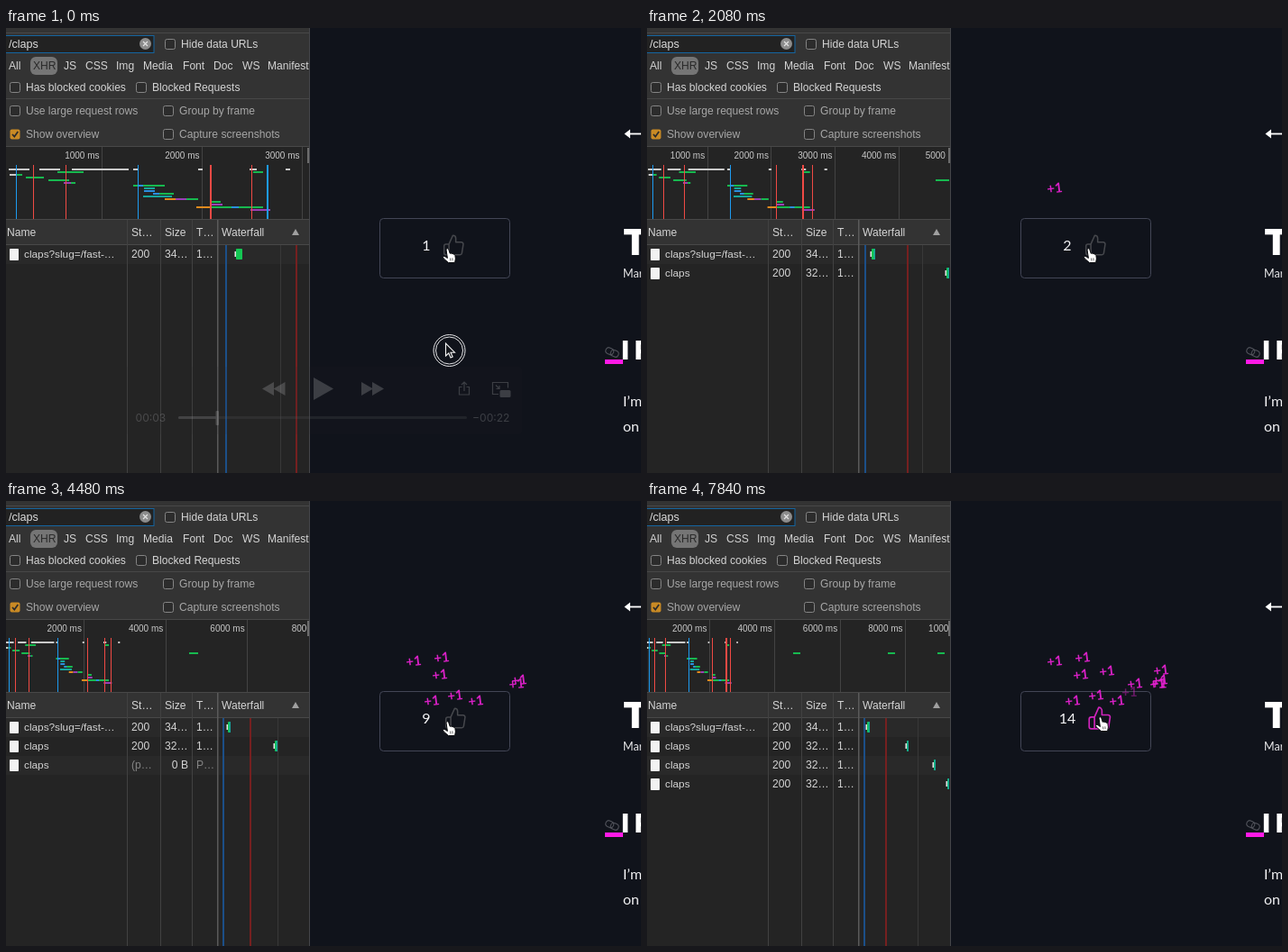
Animation, 704 px wide and 494 px high, one loop 8 s. Source, as an HTML page:

```html
<!DOCTYPE html>
<html lang="en">
<head>
<meta charset="utf-8">
<title>Clap button and network panel</title>
<style>
html, body { margin: 0; width: 100%; height: 100%; overflow: hidden; background: #10131b; }
svg { display: block; width: 704px; height: 494px; }
text { font: 12.1px "Liberation Sans", Arial, sans-serif; white-space: pre; }
.page { font-family: Lato, "Open Sans", sans-serif; }
.heavy { font-family: Inter, sans-serif; font-weight: 900; }
.clock { font-family: Inter, sans-serif; }
</style>
</head>
<body>
<svg viewBox="0 0 704 494">
  <defs><clipPath id="panel"><rect width="336" height="494"/></clipPath></defs>
  <g id="still"></g>
  <g id="live"></g>
</svg>
<script>
const LOOP = 8000, STEP = 160;
const PINK = '#ff1ae6';

const rect = (x, y, w, h, fill, more = '') =>
  `<rect x="${x}" y="${y}" width="${w}" height="${h}" fill="${fill}" ${more}/>`;
const text = (x, y, s, fill = '#d4d4d4', more = '') =>
  `<text x="${x}" y="${y}" fill="${fill}" ${more}>${s}</text>`;
const path = (d, fill = 'none', more = '') => `<path d="${d}" fill="${fill}" ${more}/>`;
const group = (attrs, body) => `<g ${attrs}>${body}</g>`;
const at = (x, y, body) => group(`transform="translate(${x} ${y})"`, body);
const vline = (x, y1, y2, color, w = 1) => rect(x, y1, w, y2 - y1, color);
const hline = (y, color) => rect(0, y, 336, 1, color);
const rings = (x, y, r, color) => [r, r - 2.5].map(v =>
  `<circle cx="${x}" cy="${y}" r="${v}" fill="none" stroke="${color}"/>`).join('');

// Unchanging parts

function checkbox(x, y, label, color, on) {
  const box = on
    ? rect(x + .5, y + .5, 11, 11, '#c98a24', 'rx="2"') +
      path(`M${x + 3} ${y + 6}l2.3 2.6 4-5.6`, 'none', 'stroke="#2b2b2b" stroke-width="1.7"')
    : rect(x + .5, y + .5, 11, 11, '#2c2c2c', 'rx="2" stroke="#858585"');
  return box + text(x + 18, y + 10, label, color);
}

function panel() {
  const tabs = [['All', 3], ['JS', 64], ['CSS', 88], ['Img', 122], ['Media', 152],
    ['Font', 196], ['Doc', 230], ['WS', 262], ['Manifest', 290]];
  const heads = [['Name', 1], ['St…', 139], ['Size', 176], ['T…', 211], ['Waterfall', 239]];
  const soft = '#a6a6a6';
  return rect(0, 0, 336, 494, '#242424') +
    rect(0, 0, 336, 131, '#333') + hline(5, '#484848') + hline(78, '#484848') + hline(131, '#484848') +
    rect(-2, 8.5, 166, 19, '#222', 'stroke="#1565a0"') +
    text(3, 22, '/claps', '#dcdcdc', 'style="font-size:12.600px"') +
    '<circle cx="154.5" cy="17.5" r="6.5" fill="#8c8c8c"/>' +
    path('M152 15l5 5m0-5l-5 5', 'none', 'stroke="#e2e2e2" stroke-width="1.2"') +
    checkbox(176, 12, 'Hide data URLs') +
    rect(27, 32, 30, 20, '#757575', 'rx="6"') + text(30, 46, 'XHR', '#2a2a2a') +
    tabs.map(([s, x]) => text(x, 46, s)).join('') +
    checkbox(4, 60, 'Has blocked cookies') + checkbox(144, 60, 'Blocked Requests') +
    checkbox(4, 86, 'Use large request rows', soft) + checkbox(174, 86, 'Group by frame', soft) +
    checkbox(4, 112, 'Show overview', soft, true) + checkbox(174, 112, 'Capture screenshots', soft) +
    rect(0, 212, 336, 29, '#333') + hline(212, '#484848') + hline(240, '#484848') +
    heads.map(([s, x]) => text(x, 231, s)).join('') + path('M317 230l4-7 4 7z', '#a0a0a0');
}

function page() {
  return rect(336, 0, 1, 494, '#45464a') +
    path('M704 117.500H688', 'none', 'stroke="#fff" stroke-width="1.8"') +
    path('M692 112.500l-6.500 5 6.500 5z', '#fff') +
    text(684, 252, 'T', '#fff', 'class="heavy" style="font-size:40px"') +
    text(684, 277, 'Mar', '#e8e8ea', 'class="page" style="font-size:12.500px"') +
    text(682.5, 368, 'I', '#fff', 'class="heavy" style="font-size:28px"') +
    text(697, 368, 'P', '#fff', 'class="heavy" style="font-size:28px"') +
    text(684, 420, 'I’m', '#f0f0f2', 'class="page" style="font-size:16px"') +
    text(684, 448, 'on', '#f0f0f2', 'class="page" style="font-size:16px"') +
    group('fill="none" stroke="#50525a" stroke-width="1.1" transform="rotate(25 672 360)"',
      '<rect x="664.5" y="356.5" width="9" height="7" rx="3.5"/><rect x="670.5" y="356.5" width="9" height="7" rx="3.5"/>') +
    rect(664, 368, 20, 5, PINK) +
    rect(414.5, 211.5, 144, 66, 'none', 'rx="4" stroke="#434656"');
}

// Overview chart: bars and markers sit on the widest scale, later scales squeeze them

const WHITE = '#c9c9c9', GREEN = '#17b94f', BLUE = '#2b8fe0', TEAL = '#16a59b',
  PURPLE = '#9a3fb5', ORANGE = '#e08a1e', RED = '#f04a44', SKY = '#1d9bf0';
const BARS = [
  [156, WHITE, 3, 26, 37, 60, 73, 136, 141, 147, 213, 218, 270, 278, 310, 315],
  [159, GREEN, 57, 86, 274, 285], [162, WHITE, 4, 11], [162, GREEN, 11, 18],
  [165, GREEN, 22, 42], [168, GREEN, 47, 70], [171, PURPLE, 64, 72], [171, GREEN, 72, 77],
  [174, GREEN, 141, 176], [174, BLUE, 146, 152], [177, TEAL, 153, 165], [180, BLUE, 153, 165],
  [183, GREEN, 163, 186], [183, BLUE, 163, 170], [186, TEAL, 152, 184],
  [189, ORANGE, 176, 188], [189, PURPLE, 188, 200], [189, GREEN, 200, 213],
  [192, GREEN, 226, 238], [195, PURPLE, 226, 240],
  [198, ORANGE, 211, 226], [198, GREEN, 226, 285], [198, BLUE, 250, 258], [201, PURPLE, 271, 293]
];
const MARKS = [[11, SKY], [30, RED], [66, RED], [146, SKY], [226, RED], [272, RED], [289]];

// hits: later requests in the overview; wf: blue, red, grid line; rows: waterfall bars [x, width]
const SCALES = {
  start: { px: 111, x0: -5, tick: 1000, end: SKY, thick: [4, 6], hits: [],
    wf: [244, 322, 304], rows: [[254, 8]] },
  second: { px: 70.7, x0: -4, tick: 1000, end: RED, thick: [5], hits: [[320, 15]],
    wf: [242, 289, 305], rows: [[248, 5], [331, 4]] },
  third: { px: 45.2, x0: -4, tick: 2000, end: RED, thick: [], hits: [[203, 10]],
    wf: [241, 271, 301], rows: [[245, 4], [297, 4]] },
  wide: { px: 36.2, x0: -3.5, tick: 2000, end: RED, thick: [5], hits: [[162, 8], [267, 8]],
    wf: [241, 270, 300], rows: [[245, 3], [296, 4], [332, 3]] },
  last: { px: 36.2, x0: -3.5, tick: 2000, end: RED, thick: [5], hits: [[162, 8], [267, 8], [322, 8]],
    wf: [241, 265, 300], rows: [[243, 4], [287, 3], [317, 3], [332, 3]] }
};
// time, scale, table rows, whether the newest row is pending
const STATES = [
  [0, 'start', 1], [1760, 'start', 2, true], [1920, 'second', 2],
  [4320, 'third', 3, true], [4960, 'wide', 3], [5920, 'last', 4, true], [6080, 'last', 4]
];

function overview(s) {
  const map = x => s.x0 + (x + 5) * s.px / 111;
  let out = '';
  for (let ms = s.tick; ; ms += s.tick) {
    const x = s.x0 + ms * s.px / 1000;
    if (x > 390) break;
    out += vline(Math.round(x), 132, 212, '#434343') +
      text(x - 2.5, 145, ms + ' ms', '#c8c8c8', 'text-anchor="end" style="font-size:10px"');
  }
  for (const [y, color, ...ends] of BARS)
    for (let i = 0; i < ends.length; i += 2)
      out += rect(map(ends[i]), y, map(ends[i + 1]) - map(ends[i]), 2, color);
  MARKS.forEach(([x, color = s.end], i) =>
    out += vline(Math.round(map(x)), 152, 212, color, s.thick.includes(i) ? 2 : 1));
  s.hits.forEach(([x, w]) => out += rect(x, 168, w, 2, GREEN));
  return out + rect(334, 133, 2, 17, '#6c6c6c');
}

function table(s, count, pending) {
  const [blue, red, grid] = s.wf;
  let out = '';
  for (let i = 0; i < count; i += 2) out += rect(0, 241 + i * 21, 336, 21, '#292929');
  out += [134, 171, 206].map(x => vline(x, 213, 494, '#414141')).join('') +
    vline(234, 213, 494, '#5a5a5a', 1.5) + vline(grid, 241, 494, '#383838') +
    vline(blue - 1, 241, 494, '#1c4f88', 2) + vline(red - 1, 241, 494, '#752020', 2);
  for (let i = 0; i < count; i++) {
    const y = 255 + i * 21, wait = pending && i === count - 1, color = wait ? '#858585' : '#d4d4d4';
    out += rect(4, y - 10, 10, 13, '#f2f2f2', 'rx=".8"') +
      text(20, y, i ? 'claps' : 'claps?slug=/fast-…', '#d4d4d4', 'style="font-size:11.800px"') +
      text(139, y, wait ? '(p…' : '200', color) +
      (wait ? text(202, y, '0 B', '#d4d4d4', 'text-anchor="end"') : text(176, y, i ? '32…' : '34…')) +
      text(211, y, wait ? 'P…' : '1…', color);
    const bar = s.rows[i];
    if (bar && !wait) {
      const [x, w] = bar;
      out += rect(x - .5, y - 7, 1.5, 6, '#e4e4e4') + rect(x + 1, y - 10, w - 1, 12, '#14c653', 'rx=".8"') +
        (w < 7 ? rect(x + w - 1.5, y - 10, 1.5, 12, TEAL) : '');
    }
  }
  return out;
}

// Claps: [time, resting x, resting y]
const CLAPS = [
  [900, 452, 178], [2930, 481, 193], [3110, 498, 216], [3270, 483, 174], [3400, 472, 222],
  [3530, 521, 222], [3640, 569, 199], [3740, 566, 203], [4800, 510, 189],
  [6480, 570, 188], [6850, 541, 203], [7200, 567, 202], [7700, 524, 197]
];
const THUMB = 'M14 9V5a3 3 0 0 0-3-3l-4 9v11h11.280a2 2 0 0 0 2-1.700l1.380-9a2 2 0 0 0-2-2.300z' +
  'M7 22H4a2 2 0 0 1-2-2v-7a2 2 0 0 1 2-2h3';
const HAND = 'M4 2a1.400 1.400 0 0 1 2.700-.3l1.500 4.600q1.200-.8 2 .3 1.200-.6 1.900.6 1.500-.4 1.800 1.300l.5 3.500-.8 4.500H6.500' +
  'L1.300 12Q-.2 10.200 1 9.400q1-.5 2.300.7l2.100 1.400z';
const ARROW = 'M0 0v14l3.300-3 2.200 5 2.200-1-2.200-4.800H10z';

const hand = (x, y) => at(x, y, path(HAND, '#fff', 'stroke="#08090c" stroke-width="1"') +
  path('M8.500 11.500l.4 3m1.900-3.200l.3 3', 'none', 'stroke="#444" stroke-width=".8"'));
const arrow = (x, y) => at(x, y, path(ARROW, '#15171c', 'stroke="#f4f4f4" stroke-width="1.1"'));

function plusOne(t, [birth, x, y]) {
  if (t < birth) return '';
  const p = Math.min(1, (t - birth) / 800), left = (1 - p) ** 2;
  const px = x + 16 * left, py = y + 22 * left;
  const turn = -7 * Math.max(0, p * 3 - 2);
  return group(`transform="translate(${px} ${py}) rotate(${turn})" opacity="${.9 * Math.sqrt(p)}"`,
    text(0, 5, '+1', '#ee22d8', 'text-anchor="middle" class="page" style="font-size:15px;font-weight:700"'));
}

function button(t) {
  const done = CLAPS.filter(c => c[0] <= t), count = done.length + 1;
  const since = done.length ? t - done[done.length - 1][0] : Infinity;
  const away = t >= 5440 && t < 6240, hit = since < 200;
  const cx = count > 9 ? 502 : count > 2 ? 498.5 : 495.5 + count;
  const size = hit ? 1.18 : 1.08;
  const color = hit ? '#d024bc' : away ? '#f2f2f2' : '#46484d';
  const move = Math.min(1, Math.max(0, (t - 6080) / 480));
  let out = text(466, 247, count, '#f4f4f6', 'text-anchor="middle" class="page" style="font-size:16px"') +
    group(`transform="translate(${cx} 241) scale(${size}) translate(-12 -12)"`,
      path(THUMB, 'none', `stroke="${color}" stroke-width="1.4" stroke-linejoin="round"`)) +
    CLAPS.map(c => plusOne(t, c)).join('');
  if (since < 120) out += rings(488 + 14 * move, 244, 18 + since * .155, '#a4a4a7');
  return out + (away ? arrow(488 + 6 * move, 243) : hand(484 + 13 * move, 244 - 5 * move));
}

// Player controls
function player(t) {
  const alpha = t < 160 ? .3 : t < 320 ? .75 : t < 960 ? 1 : t < 1120 ? .6 : t < 1280 ? .25 : 0;
  if (!alpha) return '';
  const grey = '#a2a2a4', line = `stroke="${grey}" stroke-width="1.2"`;
  const middle = t < 160 ? path('M341 388v25l22-12.500z', grey)
    : rect(341, 389, 7, 24, grey) + rect(354, 389, 7, 24, grey);
  const body = rect(132, 376, 440, 75, '#27272b', `rx="4" opacity="${t < 160 ? .35 : .88}"`) +
    path('M297 393v15l-13-7.500zM309.500 393v15l-13-7.500z', grey) + middle +
    path('M394 393v15l13-7.500zM406 393v15l13-7.500z', grey) +
    path('M505.500 398.500h-3v8.500h11v-8.500h-3M508 403v-10m-3 3l3-3 3 3', 'none', line) +
    path('M546 406.500h-6.500v-13h17v6M543 396.500l4 4m0-3.500v3.500h-3.500', 'none', line) +
    rect(547.5, 402, 12, 8, grey, 'rx="1.5"') +
    text(143.5, 437, '00:03', grey, 'class="clock"') + text(517, 437, '−00:22', grey, 'class="clock"') +
    rect(191, 431, 320, 3, '#4b4b4e', 'rx="1.5"') + rect(191, 431, 43, 3, '#8c8c8e', 'rx="1.5"') +
    rect(232.5, 425, 3.5, 16, grey, 'rx="1"');
  const pointer = t < 320
    ? group(`opacity="${t < 160 ? 1 : .5}"`, rings(491.5, 358, 17.5, '#e4e4e6') + arrow(487.5, 350)) : '';
  return group(`opacity="${alpha}"`, body) + pointer;
}

function scene(t) {
  const [, name, rows, pending] = STATES.filter(s => s[0] <= t).pop();
  const s = SCALES[name];
  return group('clip-path="url(#panel)"', overview(s) + table(s, rows, pending)) + button(t) + player(t);
}

document.getElementById('still').innerHTML = group('clip-path="url(#panel)"', panel()) + page();
const live = document.getElementById('live');
const began = performance.now();
let shown = -1;

function tick() {
  const step = Math.floor(((performance.now() - began) % LOOP) / STEP);
  if (step !== shown) {
    shown = step;
    live.innerHTML = scene(step * STEP);
  }
  requestAnimationFrame(tick);
}
tick();
</script>
</body>
</html>
```
